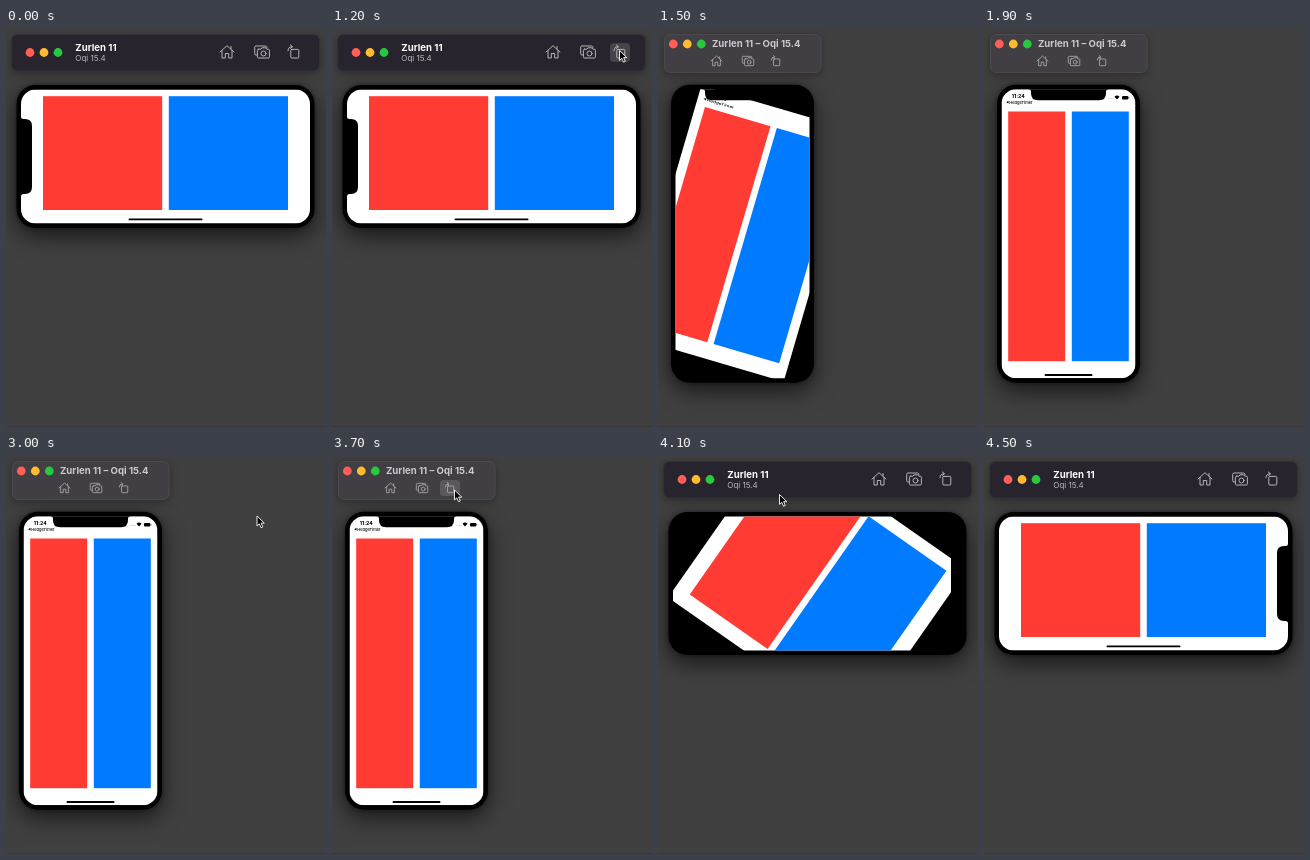
Animation of 320 by 399 pixels, one loop 5040 ms. Source, as an HTML page:

```html
<!DOCTYPE html>
<html lang="en">
<head>
<meta charset="utf-8">
<title>Device rotation</title>
<style>
  html, body { margin: 0; width: 100%; height: 100%; overflow: hidden; background: #404040; }
  svg { display: block; width: 100vw; height: 100vh; }
  text { font-family: Inter, "Liberation Sans", sans-serif; }
  .title { font-size: 9.6px; font-weight: 700; }
  .icon { fill: none; stroke: #b5b2b8; stroke-width: 1; stroke-linejoin: round; stroke-linecap: round; }
  .bar { filter: drop-shadow(0 2px 4px rgba(0, 0, 0, .3)); }
  #shade { filter: drop-shadow(0 0 2px rgba(0, 0, 0, .4)) drop-shadow(0 8px 11px rgba(0, 0, 0, .62)); }
</style>
</head>
<body>
<svg viewBox="0 0 320 399">
  <defs>
    <clipPath id="screen"><rect x="-67" y="-144.5" width="134" height="289" rx="14.5"/></clipPath>
    <g id="lights">
      <circle r="4.4" fill="#ff5f57"/>
      <circle cx="14" r="4.4" fill="#febc2e"/>
      <circle cx="28" r="4.4" fill="#28c840"/>
    </g>
    <g id="home" class="icon">
      <path d="M-7 0L0-6.3L7 0M-5-1.5V6H-1.7V1.5H1.7V6H5V-1.5M4-3V-5.5"/>
    </g>
    <g id="camera" class="icon">
      <path d="M-5 3H-6Q-7.3 3-7.3 1.7V-4.6Q-7.3-6-6-6H3.6Q5-6 5-4.4"/>
      <path d="M-3.5-2.8H-1L0-4.2H3.8L4.8-2.8H6.3Q7.4-2.8 7.4-1.7V4.8Q7.4 6 6.3 6H-3.5Q-4.6 6-4.6 4.8V-1.7Q-4.6-2.8-3.5-2.8Z"/>
      <circle cx="1.5" cy="1.5" r="2.5"/>
    </g>
    <g id="turn" class="icon">
      <rect x="-3.2" y="-2.6" width="8" height="8.6" rx="1"/>
      <path d="M-6-1.2Q-6.2-5.3-1.8-5.3M-3.6-7L-1.6-5.3L-3.6-3.6"/>
    </g>
  </defs>

  <rect width="320" height="399" fill="#404040"/>
  <rect y="398" width="320" height="1" fill="#3a363c"/>

  <g id="shade"><rect id="bezel" rx="19" fill="#000"/></g>
  <g id="device">
    <g clip-path="url(#screen)">
      <g id="content">
        <rect id="page" fill="#fff"/>
        <rect id="red" fill="#ff3b33"/>
        <rect id="blue" fill="#007aff"/>
        <rect id="grip" rx="1"/>
        <g id="status">
          <text x="-56.7" y="-135.8" font-size="5.2" font-weight="700">11:24</text>
          <text x="-59.3" y="-130" font-size="4" font-weight="500">HedgeTimer</text>
          <path d="M-62.3-131.5L-60-132.9V-130.1Z"/>
          <path d="M40-135.4H45" stroke="#aaa" stroke-width=".8" stroke-dasharray=".8 .6"/>
          <path d="M46-137Q48.5-139.2 51-137L48.5-134.2Z"/>
          <rect x="53.5" y="-137.8" width="6.3" height="3.5" rx="1"/>
          <rect x="60.1" y="-136.8" width=".6" height="1.4"/>
        </g>
      </g>
      <path d="M-40-146V-144.5Q-37.5-144.5-37.5-142V-140.5Q-37.5-133.5-30.5-133.5H30.5Q37.5-133.5 37.5-140.5V-142Q37.5-144.5 40-144.5V-146Z"/>
    </g>
  </g>

  <g id="wide">
    <rect class="bar" x="5.5" y="6.5" width="308" height="36.5" rx="6" fill="#28242d" stroke="#343039"/>
    <use href="#lights" x="24" y="24.5"/>
    <text class="title" x="69.3" y="23" fill="#fff">Zurlen 11</text>
    <text x="69.3" y="33" font-size="8" fill="#b9b6bd">Oqi 15.4</text>
    <rect id="wideHover" x="278" y="15" width="20" height="19" rx="4" fill="#47434b"/>
    <use href="#home" x="221" y="24"/>
    <use href="#camera" x="256" y="24"/>
    <use href="#turn" x="288" y="24"/>
  </g>

  <g id="tall">
    <rect class="bar" x="6.5" y="6.5" width="156.5" height="38" rx="6" fill="#423f44" stroke="#4d4a4f"/>
    <use href="#lights" x="15.3" y="16"/>
    <text class="title" x="54" y="19.4" fill="#cbc9cd">Zurlen 11 – Oqi 15.4</text>
    <rect id="tallHover" x="108" y="25" width="20" height="16" rx="4" fill="#5b585d"/>
    <use href="#home" transform="translate(58.5 33) scale(.78)"/>
    <use href="#camera" transform="translate(90 33) scale(.78)"/>
    <use href="#turn" transform="translate(118 33) scale(.78)"/>
  </g>

  <path id="cursor" d="M.5.5V10.4L2.8 8.3L4.5 12.2L6.3 11.4L4.6 7.6H7.8Z" fill="#000" stroke="#fff" stroke-width=".9" stroke-linejoin="round"/>
</svg>
<script>
const LOOP = 5040, STEP = 100;
const TO_TALL = 1300, TO_WIDE = 3800;
const $ = id => document.getElementById(id);

// [x, y, width, height] from the screen centre: landscape, portrait
const parts = {
  page: [[-144.5, -67, 289, 134], [-67, -144.5, 134, 289]],
  red: [[-122.5, -60.3, 119.2, 113.8], [-60.3, -122.2, 57, 249.7]],
  blue: [[3.3, -60.3, 119.2, 113.8], [3.3, -122.2, 57, 249.7]],
  grip: [[-37, 62, 74, 1.8], [-24, 140.4, 48, 1.8]]
};

const clamp = v => Math.min(1, Math.max(0, v));
const ease = v => (1 - Math.cos(Math.PI * clamp(v))) / 2;
const mix = (a, b, k) => a + (b - a) * k;
const show = (id, on) => $(id).setAttribute("visibility", on ? "visible" : "hidden");

function setRect(id, box) {
  ["x", "y", "width", "height"].forEach((name, i) => $(id).setAttribute(name, box[i]));
}

function pointer(t) {
  if (t >= 200 && t < 800) {
    const k = ease((t - 200) / 500);
    return [mix(27, 282, k), mix(65, 24, k)];
  }
  if (t >= 800 && t < 1400) return [287, 22];
  if (t >= 3000 && t < 3600) {
    const k = ease((t - 3000) / 500);
    return [mix(250.5, 127, k), mix(60.5, 38, k)];
  }
  if (t >= 3600 && t < 4100) return [122, 34.5];
  if (t >= 4100 && t < 4200) return [121, 39];
  return null;
}

function draw(t) {
  const tall = t >= TO_TALL && t < TO_WIDE;
  const first = t < TO_TALL;
  const turned = first ? 1 : tall ? ease((t - 1248) / 350) : ease((t - 3900) / 350);
  const portrait = first ? 0 : tall ? turned : 1 - turned;
  const deviceAngle = first ? -90 : tall ? 0 : 90;
  const contentAngle = 90 * (1 - turned);
  const [cx, cy] = tall ? [84.5, 205.7] : [159.5, 128.5];
  const [w, h] = tall ? [143, 298] : [298, 143];

  setRect("bezel", [cx - w / 2, cy - h / 2, w, h]);
  $("device").setAttribute("transform", `translate(${cx} ${cy}) rotate(${deviceAngle})`);
  $("content").setAttribute("transform", `rotate(${contentAngle - deviceAngle})`);

  for (const id in parts) {
    const [wide, high] = parts[id];
    setRect(id, wide.map((v, i) => mix(v, high[i], portrait)));
  }
  const fadeStart = tall ? 1650 : 4250;
  $("grip").setAttribute("opacity", first ? 1 : clamp((t - fadeStart) / 250));

  // The status bar stretches with the page.
  const sx = mix(289 / 134, 1, portrait), sy = mix(134 / 289, 1, portrait);
  $("status").setAttribute("transform", `scale(${sx} ${sy})`);
  show("status", tall);

  show("wide", !tall);
  show("tall", tall);
  show("wideHover", first && t >= 700);
  show("tallHover", tall && t >= 3600);

  const at = pointer(t);
  show("cursor", at);
  if (at) $("cursor").setAttribute("transform", `translate(${at[0]} ${at[1]})`);
}

const start = performance.now();
function tick() {
  const t = (performance.now() - start) % LOOP;
  draw(Math.floor(t / STEP) * STEP);
  requestAnimationFrame(tick);
}
tick();
</script>
</body>
</html>
```
